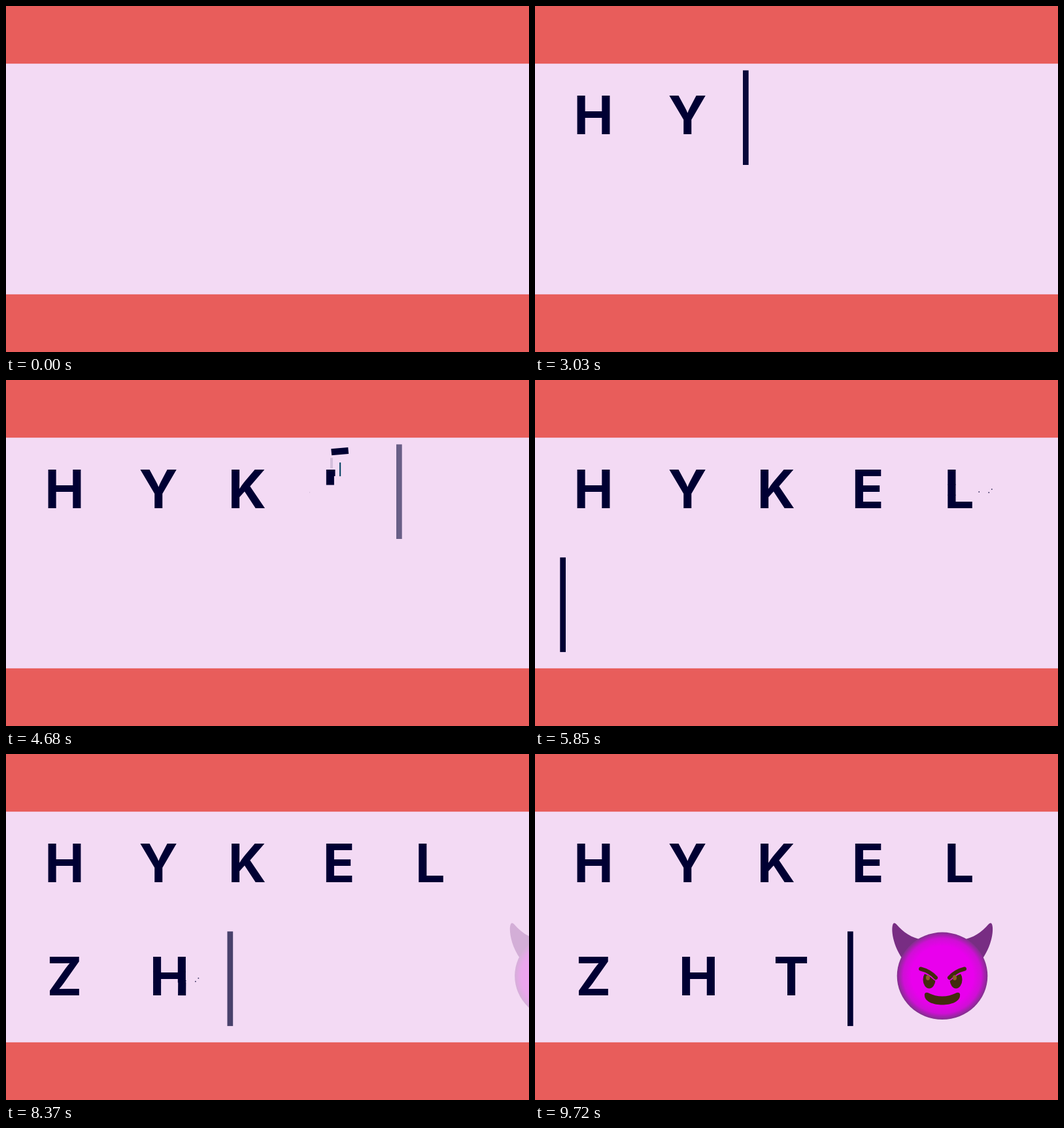
An HTML page with a canvas that plays this animation: 800x529 px, repeating every 9750 ms.

```html
<!DOCTYPE html>
<html lang="en">
<head>
<meta charset="utf-8">
<title>Typed name</title>
<style>
  html, body { margin: 0; width: 100%; height: 100%; overflow: hidden; background: #f3daf4; }
  canvas, svg { position: absolute; left: 0; top: 0; display: block; }
</style>
</head>
<body>
<canvas id="stage" width="800" height="529"></canvas>
<svg width="800" height="529" viewBox="0 0 800 529">
  <defs>
    <radialGradient id="skin">
      <stop offset=".68" stop-color="#e900ed"/>
      <stop offset=".86" stop-color="#cf0fd5"/>
      <stop offset="1" stop-color="#81308c"/>
    </radialGradient>
    <path id="horn" d="M549 258.5C544 261 545 289 562 313L594 284C576 282 563 272 553 260.5Q551 258 549 258.5Z" fill="#782d83"/>
    <g id="eye" fill="none" stroke-linecap="round">
      <ellipse cx="603" cy="345" rx="9.5" ry="13.5" fill="#422b0d"/>
      <path d="M590 329.5Q604 333 613 342" stroke="#e303e8" stroke-width="9"/>
      <path d="M590 328.5Q604 332 613 342" stroke="#422b0d" stroke-width="6"/>
    </g>
  </defs>
  <g id="imp">
    <use href="#horn"/>
    <use href="#horn" transform="matrix(-1 0 0 1 1246.5 0)"/>
    <ellipse cx="623" cy="339.3" rx="69.3" ry="66.7" fill="url(#skin)"/>
    <use href="#eye"/>
    <use href="#eye" transform="matrix(-1 0 0 1 1247 0)"/>
    <g fill="#896024">
      <ellipse cx="601" cy="342" rx="3" ry="4"/>
      <ellipse cx="642" cy="342" rx="3" ry="4"/>
    </g>
    <path d="M601 365Q623 376 645 365Q651 364 650 370C648 388 598 388 596 370Q595 364 601 365Z" fill="#422b0d"/>
  </g>
</svg>
<script>
const LOOP = 9750, INK = '#000033', BAR = 529 / 6;
const LINE1 = 98.4, LINE2 = 271.3;
const ctx = document.getElementById('stage').getContext('2d');
const imp = document.getElementById('imp');

// letter, typing time, centre, baseline, then the caret's next x and top
const keys = [
  ['H', 915, 89.5, 196, 178.5, LINE1],
  ['Y', 1980, 233, 196, 318, LINE1],
  ['K', 3240, 369, 196, 457.5, LINE1],
  ['E', 4380, 509, 196, 597, LINE1],
  ['L', 5220, 649, 196, 38.3, LINE2],
  ['Z', 6210, 89.5, 369, 178.5, LINE2],
  ['H', 7830, 250, 369, 338.5, LINE2],
  ['T', 8850, 392, 369, 478, LINE2]
];

// glyph pieces, left and right in three rows: delay, start dx, dy, turn
const pieces = [
  [60, 0, -30, .2], [270, -8, -55, -.142],
  [300, -34, 4, .3], [305, 34, 0, -.2],
  [310, -20, 34, .2], [400, 12, 4, .3]
];
const rows = [-80, -36, -20, 25];

const clamp = v => Math.max(0, Math.min(1, v));
const ramp = (t, from, to) => clamp((t - from) / (to - from));

function rect(color, x, y, w, h, alpha = 1) {
  ctx.globalAlpha = alpha;
  ctx.fillStyle = color;
  ctx.fillRect(x, y, w, h);
  ctx.globalAlpha = 1;
}

function drawPiece(letter, i, age) {
  const [delay, dx, dy, turn] = pieces[i];
  const k = ramp(age, delay, delay + 200);
  if (!k) return;
  const rest = (1 - k) ** 3;
  const size = Math.min(1, k * 7);
  const right = i % 2, row = i >> 1;
  const cx = right ? 8 : -11, cy = [-48, -28, -10][row];
  ctx.save();
  ctx.translate(cx + dx * rest, cy + dy * rest);
  ctx.rotate(turn * rest);
  ctx.scale(size, size);
  ctx.translate(-cx, -cy);
  ctx.beginPath();
  // a slight overlap keeps the seams closed
  ctx.rect(right ? -6 : -60, rows[row] - .5, right ? 66 : 54.5, rows[row + 1] - rows[row] + 1);
  ctx.clip();
  ctx.fillText(letter, 0, 0);
  ctx.restore();
}

function drawSparks(age) {
  if (age > 230 && age < 370) {
    const drop = (age - 300) * .15, fade = 1 - Math.abs(age - 300) / 70;
    rect(INK, -13, -77 + drop, 4, 16, .13 * fade);
    rect('#0f4a68', 1, -70 + drop, 2.2, 21, fade);
  }
  if (age > 470 && age < 640) {
    const out = (age - 540) * .06;
    for (const [x, y] of [[39, -22], [43.5, -27], [24, -23]])
      rect(INK, x + out, y - out / 2, 1.6, 1.6, .8);
  }
}

function drawLetter([letter, start, x, y], t) {
  const age = t - start;
  if (age < 0) return;
  ctx.save();
  ctx.translate(x, y);
  ctx.fillStyle = INK;
  if (age > 640) ctx.fillText(letter, 0, 0);
  else {
    pieces.forEach((_, i) => drawPiece(letter, i, age));
    drawSparks(age);
  }
  ctx.restore();
}

function drawCaret(t) {
  if (t < 120) return;
  const key = keys.findLast(k => t >= k[1]);
  let x = 38.3, y = LINE1, alpha;
  if (key) {
    const age = t - key[1];
    x = key[4];
    y = key[5];
    alpha = age < 435 ? 1 - ramp(age, 210, 420)
      : age < 1000 ? ramp(age, 450, 580)
      : 1 - ramp(age, 1040, 1350) + ramp(age, 1590, 1720);
  } else {
    alpha = 1 - ramp(t, 360, 630) + ramp(t, 800, 920);
  }
  rect(INK, x, y, 8.7, 144.6, clamp(alpha));
}

function draw(t) {
  rect('#f3daf4', 0, 0, 800, 529);
  rect('#e85d5b', 0, 0, 800, BAR);
  rect('#e85d5b', 0, 529 - BAR, 800, BAR);
  ctx.font = '700 81px Inter, "Open Sans", sans-serif';
  ctx.textAlign = 'center';
  keys.forEach(key => drawLetter(key, t));
  drawCaret(t);

  const slide = 1 - (1 - ramp(t, 8236, 9236)) ** 2;
  imp.setAttribute('transform', `translate(${300 * (1 - slide)} 0)`);
  imp.setAttribute('opacity', slide);
}

const begin = performance.now();
function tick() {
  draw((performance.now() - begin) % LOOP);
  requestAnimationFrame(tick);
}
tick();
</script>
</body>
</html>
```
